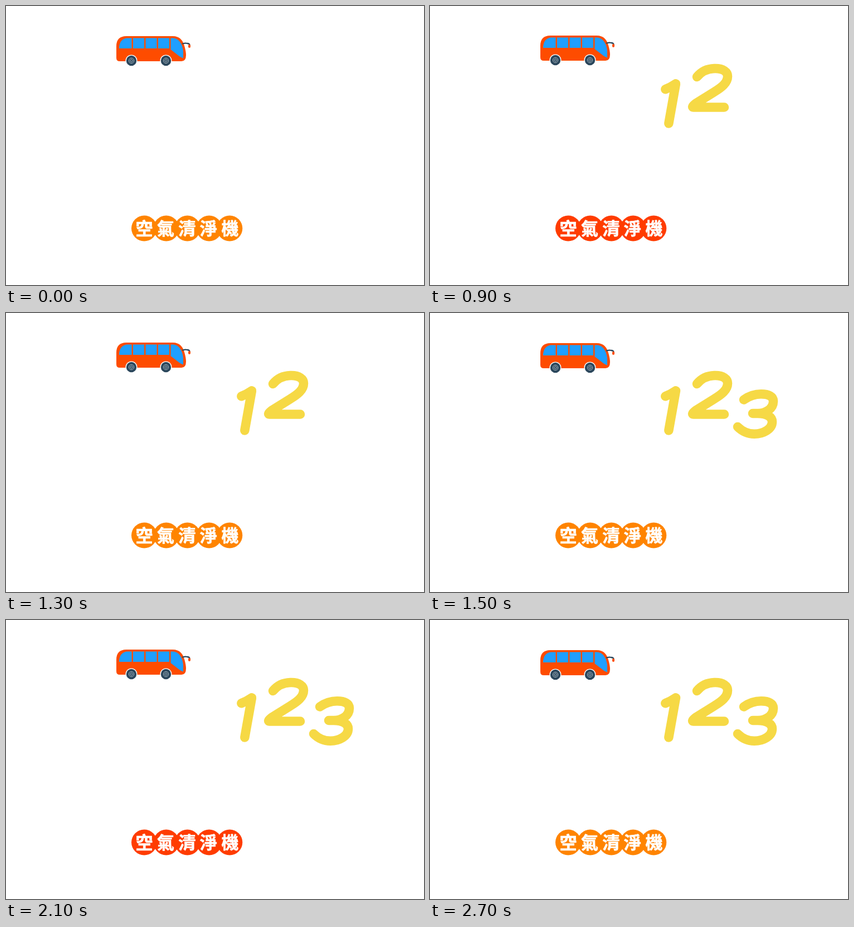
These frames come from a looping animation (750 px wide and 500 px high, 2900 ms). An HTML page:

```html
<!DOCTYPE html>
<html lang="zh-Hant">
<head>
<meta charset="utf-8">
<style>
html, body { margin: 0; width: 100%; height: 100%; overflow: hidden; background: #fff; }
svg { display: block; width: 750px; height: 500px; }
#digits { fill: none; stroke: #f6d945; stroke-width: 16.5; stroke-linecap: round; stroke-linejoin: round; }
#label { font: 700 31px "Noto Sans CJK TC", "Noto Sans CJK", sans-serif; text-anchor: middle;
  fill: #fff; stroke: #fff; stroke-width: .7; stroke-linejoin: round; }
</style>
</head>
<body>
<svg viewBox="0 0 750 500">
  <defs>
    <g id="wheel">
      <circle r="10.6" fill="#fff"/>
      <circle r="9.2" fill="#2b475c"/>
      <circle r="4.6" fill="none" stroke="#a9b8c2" stroke-width="1"/>
      <circle r="2.2" fill="none" stroke="#a9b8c2" stroke-width="1"/>
    </g>
  </defs>
  <g id="bus">
    <path fill="#fe4c00" d="M198 72 Q198 54 216 54 H299 C312 54 318 62 320.500 73 Q323 82 323 88 Q323 99 315 99 H204 Q198 99 198 93 Z"/>
    <g fill="#1f9fff">
      <path d="M203 76 V73 Q205 58 218 57.500 H225.500 V76 Z"/>
      <path d="M228 57.500 H248 V76 H228 Z M250.500 57.500 H270.500 V76 H250.500 Z M273 57.500 H293 V76 H273 Z"/>
      <path d="M295.500 57.500 H300 C311 58 317 70 318 82 V93.500 Q315 93 311 90 L295.500 78 Z"/>
    </g>
    <path fill="none" stroke="#2b475c" stroke-width="2.300" stroke-linecap="round" d="M317 67.500 Q322 66 325 67 Q329 67 329.500 70"/>
    <rect x="327" y="69" width="4" height="6" rx="2" fill="#fe4c00"/>
    <use href="#wheel" x="225" y="98"/>
    <use href="#wheel" x="287" y="98"/>
  </g>
  <g id="digits">
    <path d="M422.300 149.300 Q432 145.500 441 139.300 L428.300 210.500"/>
    <path d="M479 127 C488 116 500 112 512 112 C526 112 534 118 534 126 C534 138 523 146 510 154 L477 174.500 Q468 181.500 473 181.500 H528"/>
    <path d="M563 155.500 C573 148.500 583 145.300 594 145.300 C608 145.300 616 150 616 158 C616 172 602 180 588 180 H579 M588 180 C604 180 614 186 614 195 C614 208 598 216.700 582 216.700 C569 216.700 559 211 552 204"/>
  </g>
  <g id="dots"></g>
  <g id="label"></g>
</svg>
<script>
const $ = id => document.getElementById(id);
const centers = [248, 287.5, 325.5, 364.5, 401.3];
$('dots').innerHTML = centers.map(x => `<circle cx="${x}" cy="398.500" r="23"/>`).join('');
$('label').innerHTML = [...'空氣清淨機']
  .map((c, i) => `<text x="${248 + i * 38.5}" y="410">${c}</text>`).join('');

const digitStart = [1, 3, 6];

function draw() {
  const t = performance.now() % 2900;
  // The first pose holds for 500 ms, the rest for 200 ms each.
  const step = t < 500 ? 0 : 1 + Math.floor((t - 500) / 200);
  $('bus').setAttribute('transform', `translate(0 ${-(step % 2)})`);
  const red = step > 0 && Math.floor((step - 1) / 3) % 2 === 0;
  $('dots').setAttribute('fill', red ? '#ff3c00' : '#ff8400');
  [...$('digits').children].forEach((digit, i) => {
    digit.style.visibility = step >= digitStart[i] ? 'visible' : 'hidden';
  });
  requestAnimationFrame(draw);
}
draw();
</script>
</body>
</html>
```
